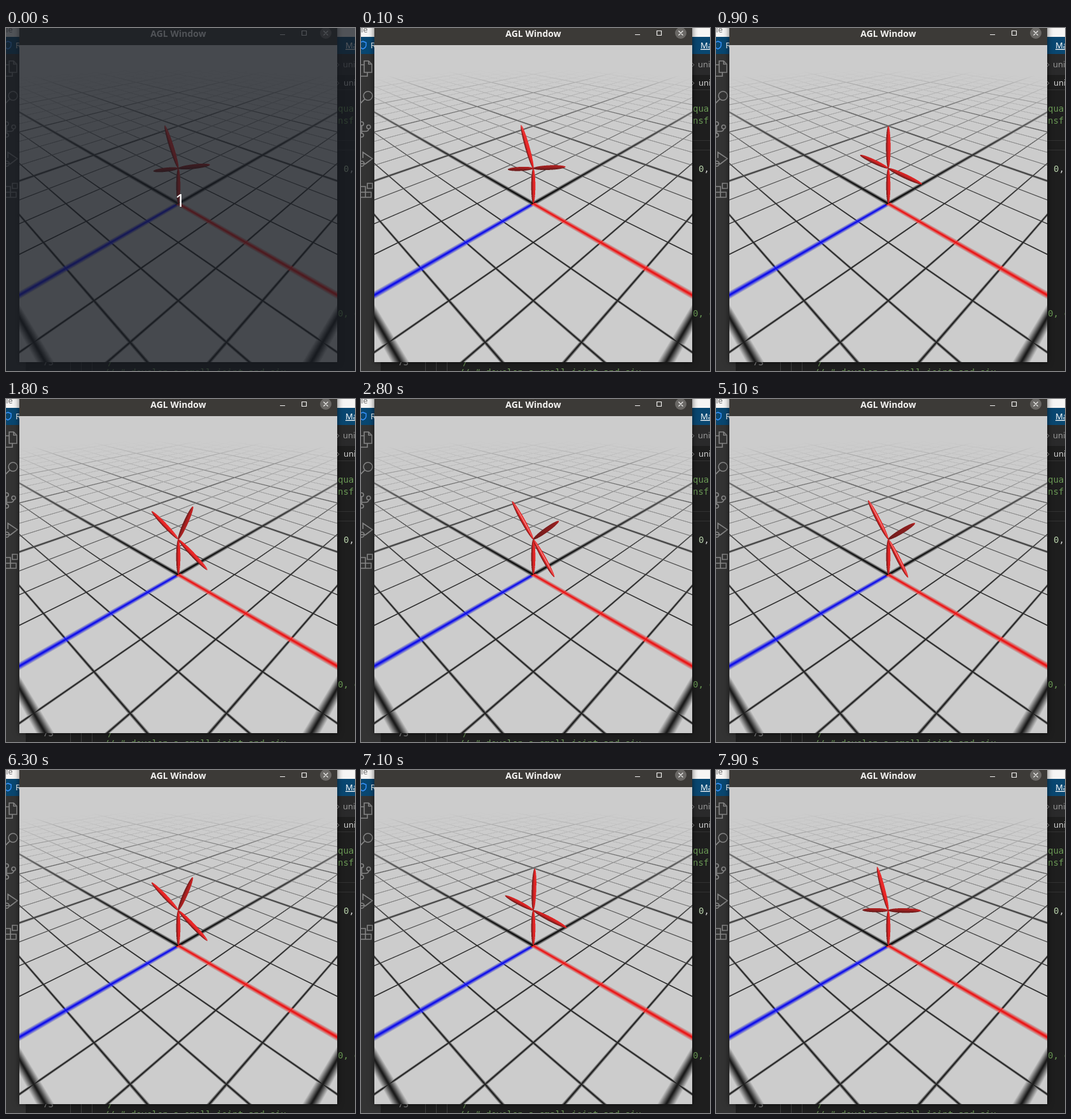
An HTML page with a canvas that plays this animation: 549x541 px, repeating every 8 s.

```html
<!DOCTYPE html>
<html lang="en">
<head>
<meta charset="utf-8">
<title>AGL Window</title>
<style>
  html, body { margin: 0; width: 100%; height: 100%; overflow: hidden; background: #1e1e1e; }
  #stage { position: relative; width: 549px; height: 541px; overflow: hidden; }
  #stage > * { position: absolute; left: 0; top: 0; }
  #window { left: 21px; top: -20px; width: 500px; height: 547px; background: #3c3a37; box-shadow: 0 0 9px rgba(0, 0, 0, .6); }
  #view { left: 21px; top: 27px; }
  #links { left: 220px; top: 148px; }
  .ui { font: 13px "Noto Sans", "Open Sans", sans-serif; }
  .code { font: 14px "DejaVu Sans Mono", "Noto Sans Mono", monospace; }
  .icon { fill: none; stroke: #858585; stroke-width: 1.6; }
  #dim { width: 549px; height: 541px; background: rgba(23, 27, 35, .74); }
  #dim span { position: absolute; left: 254px; top: 252px; width: 40px; text-align: center; color: #fff;
    font: 28px/38px "Noto Sans", "Open Sans", sans-serif; }
</style>
</head>
<body>
<div id="stage">
  <svg width="549" height="541">
    <rect width="549" height="541" fill="#1e1e1e"/>
    <rect width="549" height="14" fill="#f6f5f4"/>
    <rect y="14" width="549" height="27" fill="#094771"/>
    <rect y="41" width="31" height="500" fill="#333"/>
    <rect x="521" y="41" width="28" height="33" fill="#2a2a2b"/>
    <path d="M521 97.500H549M521 177.500H549M521 192.500H549" stroke="#333"/>
    <g class="ui">
      <text x="0" y="7" fill="#777">le</text>
      <text x="15" y="32" fill="#fff">R</text>
      <text x="534" y="32" fill="#fff" text-decoration="underline">Ma</text>
      <text x="530" y="62" fill="#969696">uni</text>
      <text x="531" y="91" fill="#d0d0d0">uni</text>
    </g>
    <path d="M521 55l3 3-3 3M521 84l3 3-3 3" fill="none" stroke="#999"/>
    <path d="M3 21l5 2v4q0 4-5 6-5-2-5-6v-4z" fill="none" stroke="#3794ff" stroke-width="1.400"/>
    <g class="icon">
      <path d="M5 52h7l5 5v13H5zM12 52v5h5M5 58H-2v18H10v-6"/>
      <circle cx="11" cy="107" r="7"/><path d="M6 112l-8 8"/>
      <circle cx="1" cy="151" r="3"/><circle cx="12" cy="156" r="3"/><circle cx="1" cy="169" r="3"/>
      <path d="M1 154v12M12 159q0 4-5 4H1"/>
      <path d="M3 205v-9l15 10-12 9"/><circle cx="1" cy="214" r="4"/><path d="M-4 214H6"/>
      <path d="M-2 250H7v17M-2 259H16v8H-2zM10 245h8v8h-8z"/>
    </g>
    <g class="code">
      <g fill="#6a9955">
        <text x="522" y="132">qua</text>
        <text x="522" y="151">nsf</text>
        <text x="522" y="455">0, c</text>
        <text x="154" y="548">// # develop a small joint and six</text>
      </g>
      <text x="531" y="227" fill="#d4d4d4"><tspan fill="#b5cea8">0</tspan>,</text>
      <text x="58" y="532" fill="#858585">73</text>
      <text x="160" y="532" fill="#6a9955">/</text>
    </g>
    <path d="M101.500 527V541M118.500 527V541M135.500 527V541" stroke="#404040"/>
  </svg>

  <div id="window"></div>
  <canvas id="view" width="500" height="500"></canvas>
  <canvas id="links" width="110" height="142"></canvas>

  <svg width="549" height="27">
    <text x="271" y="14" text-anchor="middle" fill="#f4f3f1"
      style="font: bold 14px 'Noto Sans', 'Open Sans', sans-serif">AGL Window</text>
    <circle cx="503" cy="8" r="9" fill="#6b6966"/>
    <path d="M431 10.500h8M465.500 4.500h7v7h-7zM499.500 4.500l7 7m0-7l-7 7" fill="none" stroke="#f0efed" stroke-width="1.200"/>
  </svg>
  <div id="dim"><span>1</span></div>
</div>

<script>
const LOOP = 8000, STEP = 100, DIM_END = 100;
const CX = 271, CY = 277;                  // screen position of the world origin
const FOCAL = 250 * Math.sqrt(3);          // 60 degree view, 500 px tall
const EYE = [4, 4, 4], DIST = Math.hypot(...EYE);
const SIN = Math.sqrt(1 / 3), COS = Math.sqrt(2 / 3);

const clamp = v => Math.max(0, Math.min(1, v));
const dot = (a, b) => a[0] * b[0] + a[1] * b[1] + a[2] * b[2];
const unit = v => { const n = Math.hypot(...v); return v.map(c => c / n); };
const mix = (a, b, k) => a + (b - a) * k;

const RIGHT = unit([1, 0, -1]), UP = unit([-1, 2, -1]), BACK = unit(EYE);
const LIGHT = unit([.75, .65, .1]);
const HALF = unit(LIGHT.map((c, i) => c + BACK[i]));

// Point of the floor seen at an offset from the view centre
function floorAt(px, py) {
  const s = DIST * py / (FOCAL * SIN + COS * py);
  const u = px * (DIST - COS * s) / FOCAL;
  return [(s + u) * Math.SQRT1_2, (s - u) * Math.SQRT1_2];
}

// Share of a soft window around distance d that a line of half width `half` fills
function cover(d, half, soft) {
  return clamp((Math.min(d + soft / 2, half) - Math.max(d - soft / 2, -half)) / soft);
}

function drawFloor() {
  const ctx = document.getElementById("view").getContext("2d");
  const img = ctx.createImageData(500, 500);
  const near = (v, n) => Math.abs(v - n * Math.round(v / n));
  const thin = (d, g) => cover(d, .016, Math.max(.026, 1.2 * g));
  const wide = (d, g) => cover(d, .048, Math.max(.085, 1.2 * g));

  for (let y = 0, i = 0; y < 500; y++) {
    for (let x = 0; x < 500; x++, i += 4) {
      const px = x - 249.5, py = y - 249.5;
      const p = floorAt(px, py), r = floorAt(px + 1, py), d = floorAt(px, py + 1);
      const fade = clamp((25 - Math.hypot(p[0] - 4, 4, p[1] - 4)) / 18);
      const g = [0, 1].map(k => Math.hypot(r[k] - p[k], d[k] - p[k]));
      let line = 0;
      for (const k of [0, 1]) {
        line = Math.max(line, thin(near(p[k], 1), g[k]), wide(near(p[k], 4), g[k]));
      }
      // Axis colours tint the dark lines that lie on them
      let ink = [28, 28, 28];
      const tint = (color, a) => { ink = ink.map((c, k) => mix(c, color[k], clamp(3 * a))); };
      tint(p[1] > 0 ? [10, 10, 232] : [4, 4, 4], wide(Math.abs(p[0]), g[0]));
      tint(p[0] > 0 ? [234, 18, 18] : [4, 4, 4], wide(Math.abs(p[1]), g[1]));
      img.data.set([...ink.map(c => mix(204, c, line * fade)), 255], i);
    }
  }
  ctx.putImageData(img, 0, 0);
}

// A spindle one unit long that starts at `base` and points along `axis`
function makeLink(base, axis) {
  const from = EYE.map((c, i) => c - base[i] - axis[i] / 2);
  const flat = 1 / .05 ** 2, bend = 1 / .5 ** 2 - flat;
  const form = (a, b) => flat * dot(a, b) + bend * dot(a, axis) * dot(b, axis);
  const c = form(from, from) - 1;
  return {
    hit(ray) {
      const a = form(ray, ray), b = form(from, ray), disc = b * b - a * c;
      return disc < 0 ? Infinity : (-b - Math.sqrt(disc)) / a;
    },
    normal(ray, t) {
      const p = from.map((v, i) => v + ray[i] * t), along = dot(p, axis);
      return unit(p.map((v, i) => flat * v + bend * along * axis[i]));
    }
  };
}

function shade(n) {
  const lit = Math.max(0, dot(n, LIGHT));
  const shine = 130 * Math.max(0, dot(n, HALF)) ** 50;
  return [Math.min(235, 112 + 160 * lit + shine), 28 + 12 * lit + shine, 28 + 12 * lit + shine];
}

const linkCtx = document.getElementById("links").getContext("2d");
const linkImg = linkCtx.createImageData(110, 142);
const SUB = 3;

function drawLinks(seconds) {
  const turn = -Math.sin((seconds - .9) / 2);
  const c = Math.cos(turn), s = Math.sin(turn), joint = [0, 1, 0];
  const links = [
    makeLink([0, 0, 0], [0, 1, 0]),
    makeLink(joint, [-s, c, 0]),
    makeLink(joint, [c, s, 0]),
    makeLink(joint, [-c, -s, 0])
  ];
  for (let y = 0, i = 0; y < 142; y++) {
    for (let x = 0; x < 110; x++, i += 4) {
      const sum = [0, 0, 0];
      let hits = 0;
      for (let k = 0; k < SUB * SUB; k++) {
        const px = (x + 220 + (k % SUB + .5) / SUB - CX) / FOCAL;
        const py = (y + 148 + (Math.floor(k / SUB) + .5) / SUB - CY) / FOCAL;
        const ray = RIGHT.map((v, j) => v * px - UP[j] * py - BACK[j]);
        let best = Infinity, seen = null;
        for (const link of links) {
          const t = link.hit(ray);
          if (t < best) { best = t; seen = link; }
        }
        if (!seen) continue;
        hits++;
        shade(seen.normal(ray, best)).forEach((v, j) => { sum[j] += v; });
      }
      const n = hits || 1;
      linkImg.data.set([sum[0] / n, sum[1] / n, sum[2] / n, 255 * hits / (SUB * SUB)], i);
    }
  }
  linkCtx.putImageData(linkImg, 0, 0);
}

const dim = document.getElementById("dim");
const start = performance.now();
let last = -1;

function tick() {
  const t = Math.floor((performance.now() - start) % LOOP / STEP) * STEP;
  if (t !== last) {
    last = t;
    drawLinks(t / 1000);
    dim.style.display = t < DIM_END ? "block" : "none";
  }
  requestAnimationFrame(tick);
}

drawFloor();
tick();
</script>
</body>
</html>
```
